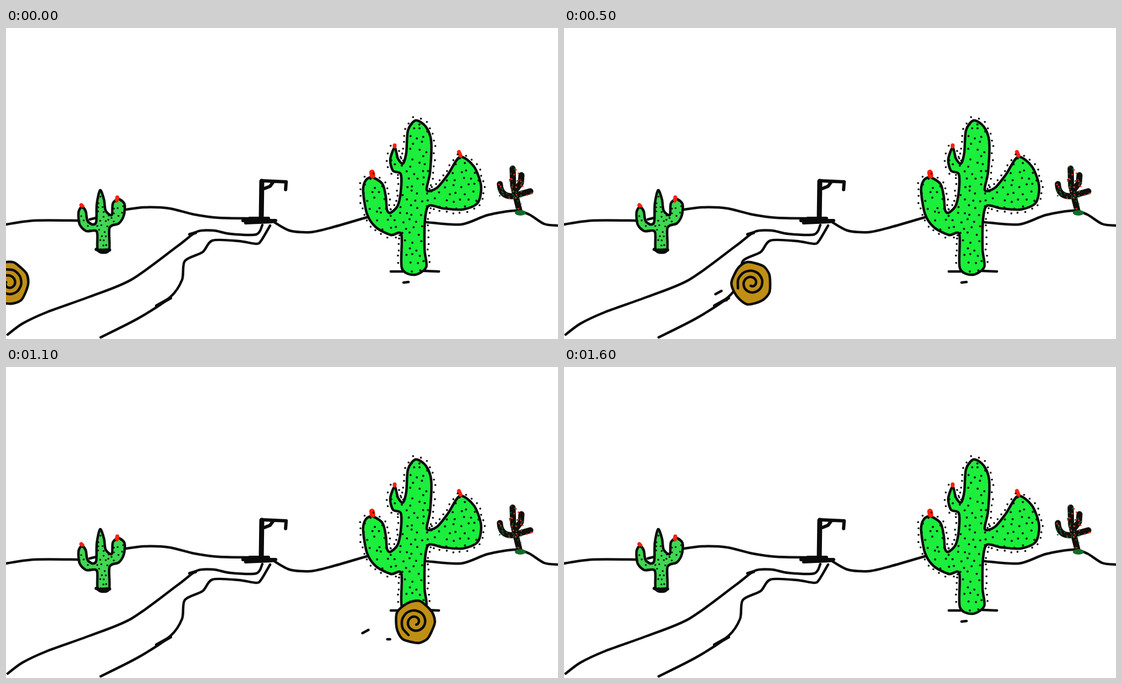
Recreate the animation shown at these times as an HTML page. Size 997 by 562 pixels, loop 2100 ms.

```html
<!DOCTYPE html>
<html lang="en">
<head>
<meta charset="utf-8">
<title>Tumbleweed</title>
<style>
  html, body { margin: 0; width: 100%; height: 100%; overflow: hidden; background: #fff; }
  svg { display: block; width: 100vw; height: 100vh; }
  path { fill: none; stroke: #0b0b0b; stroke-width: 4.5; stroke-linecap: round; stroke-linejoin: round; }
  .thick path { stroke-width: 6; }
  .red path { stroke: #fd1f10; stroke-width: 7; }
  #far path { stroke: #130f0d; stroke-width: 11; }
  #small { fill: #3fd751; }
  #large { fill: #1cee3c; }
  #rim { fill: #bf8f15; }
</style>
</head>
<body>
<svg viewBox="0 0 997 562">
  <!-- hills -->
  <path data-at="0 355, 50 348, 131 348; 151 346, 163 343; 217 328, 250 324, 295 326, 340 337, 385 343, 460 344"/>
  <path data-at="483 350, 512 366, 550 369, 590 360, 652 342; 760 351, 822 355, 870 338, 920 330, 945 337, 972 354, 997 357"/>

  <!-- road -->
  <path data-at="3 554, 30 534, 75 513, 150 486, 226 455, 310 394, 345 368, 375 366, 405 372, 452 373, 463 356"/>
  <path data-at="171 559, 240 524, 297 486, 318 455, 323 421, 355 405, 373 384, 420 385, 452 390, 461 384, 477 357"/>
  <g class="thick"><path d="M332 373L342 370M272 502L297 488"/></g>

  <!-- water pump -->
  <path d="M462 277L461 346" style="stroke-width:9"/>
  <g class="thick"><path d="M462 276L506 278L505 292M467 290L477 286L482 279M428 348H487M440 344H474M433 352L480 350"/></g>

  <!-- small cactus -->
  <path id="small" data-at="166 402, 164 368, 145 367, 133 355, 131 333, 137 323, 144 331, 147 348, 156 355, 163 350, 164 318, 170 293, 177 310, 180 330, 191 338, 193 317, 203 309, 214 318, 213 338, 204 353, 187 361, 186 402"/>
  <g class="thick"><path d="M163 400L168 402L187 401"/></g>

  <!-- large cactus -->
  <path d="M695 440H716M756 439L782 440M718 460L727 459"/>
  <path id="large" data-at="715 434, 714 373, 695 374, 668 360, 652 336, 645 294, 650 275, 662 270, 680 282, 686 305, 688 328, 694 334, 707 322, 713 296, 713 264, 699 258, 694 238, 702 216, 708 236, 717 245, 723 225, 726 185, 740 167, 758 178, 768 205, 766 260, 760 293, 778 289, 798 265, 820 233, 845 250, 858 285, 852 316, 825 328, 790 326, 764 321, 757 345, 756 400, 759 432, 738 446"/>

  <!-- flowers -->
  <g class="red">
    <path d="M136 320L138 322M200 312L201 306M702 212V214M818 224L821 231"/>
    <path d="M661 261L662 267" style="stroke-width:10"/>
  </g>

  <!-- distant cactus -->
  <g id="far">
    <path d="M915 254L916 285L927 329"/>
    <path d="M892 282Q893 304 914 304"/>
    <path d="M931 266L930 280L921 292"/>
    <path d="M922 302L947 295"/>
  </g>
  <ellipse cx="929" cy="334" rx="10" ry="5" fill="#126b28"/>

  <g id="dots"></g>

  <!-- tumbleweed -->
  <path id="dust"/>
  <g id="ball">
    <path id="rim"/>
    <path id="coil"/>
  </g>
</svg>

<script>
const $ = id => document.getElementById(id);
const svg = document.querySelector('svg');

let seed = 11;
const rand = () => (seed = seed * 16807 % 2147483647) / 2147483647;
const jitter = n => (rand() - .5) * n;

// Smooth curve through a list of [x, y]
function curve(p, closed) {
  const n = p.length;
  const at = i => closed ? p[(i + n) % n] : p[Math.max(0, Math.min(n - 1, i))];
  let d = 'M' + p[0];
  for (let i = 0; i < (closed ? n : n - 1); i++) {
    const [a, b, c, e] = [at(i - 1), at(i), at(i + 1), at(i + 2)];
    const h1 = b.map((v, j) => v + (c[j] - a[j]) / 7);
    const h2 = c.map((v, j) => v - (e[j] - b[j]) / 7);
    d += 'C' + [...h1, ...h2, ...c].map(v => v.toFixed(1)).join(' ');
  }
  return d + (closed ? 'Z' : '');
}

const parse = text => text.split(',').map(s => s.trim().split(' ').map(Number));
document.querySelectorAll('[data-at]').forEach(path =>
  path.setAttribute('d', path.dataset.at.split(';').map(s => curve(parse(s), !!path.id)).join('')));

function dot(x, y, r, fill) {
  const c = document.createElementNS(svg.namespaceURI, 'circle');
  const attrs = { cx: x.toFixed(1), cy: y.toFixed(1), r, fill };
  for (const name in attrs) c.setAttribute(name, attrs[name]);
  $('dots').appendChild(c);
}

function inside(shape, x, y) {
  const p = svg.createSVGPoint();
  p.x = x;
  p.y = y;
  return shape.isPointInFill(p);
}

function speckle(shape, gap, r) {
  const b = shape.getBBox();
  for (let y = b.y + 5, row = 0; y < b.y + b.height; y += gap * .9, row++)
    for (let x = b.x + row % 2 * gap / 2; x < b.x + b.width; x += gap) {
      const px = x + jitter(gap * .6), py = y + jitter(gap * .6);
      if (inside(shape, px, py)) dot(px, py, r, '#0c1a0c');
    }
}

// Spines standing just off the outline
function fringe(shape, gap, out, r) {
  for (let s = 0, len = shape.getTotalLength(); s < len; s += gap + jitter(4)) {
    const p = shape.getPointAtLength(s), q = shape.getPointAtLength(s + 1);
    const a = Math.atan2(q.y - p.y, q.x - p.x) - Math.PI / 2, d = out + jitter(3);
    const x = p.x + Math.cos(a) * d, y = p.y + Math.sin(a) * d;
    if (y < 430 && !inside(shape, x, y)) dot(x, y, r, '#0b0b0b');
  }
}

speckle($('small'), 9.5, 1.7);
speckle($('large'), 14, 2);
fringe($('large'), 11, 6, 1.8);

for (const arm of $('far').children)
  for (let s = 0, len = arm.getTotalLength(); s < len; s += 3) {
    const p = arm.getPointAtLength(s);
    dot(p.x + jitter(13), p.y + jitter(11), 1.4, rand() < .35 ? '#e83a22' : '#14602a');
  }

const LOOP = 2100, STEP = 100, LAST = 15;
const START = 5, STRIDE = 66.7, GROUND = 461;
const RAD = Math.PI / 180, TURN = 53 * RAD, PHASE = -106 * RAD;
const range = n => Array.from({ length: n }, (_, i) => i);

// Upright oval whose dents roll with the ball
const rim = turn => curve(range(14).map(i => {
  const a = i / 14 * 2 * Math.PI, k = 1 + .035 * Math.sin(5 * (a - turn));
  return [35 * k * Math.cos(a), 38 * k * Math.sin(a)];
}), true);

// Spiral winding inward from its outer end
const coil = turn => curve(range(19).map(i => {
  const u = i / 18, a = turn + u * 3.7 * Math.PI, r = 26 - 21 * u;
  return [r * Math.cos(a), r * Math.sin(a)];
}));

function show(k) {
  const visible = k <= LAST, x = START + STRIDE * k, turn = PHASE + TURN * k;
  $('ball').style.display = visible ? '' : 'none';
  $('ball').setAttribute('transform', `translate(${x} ${GROUND})`);
  $('rim').setAttribute('d', rim(turn));
  $('coil').setAttribute('d', coil(turn));
  $('dust').setAttribute('d', visible && k ? `M${x - 50} 492h5M${x - 40 - 5 * k} 481l11-6` : '');
}

let shown = -1;
function tick() {
  const k = Math.floor(performance.now() % LOOP / STEP);
  if (k !== shown) show(shown = k);
  requestAnimationFrame(tick);
}
tick();
</script>
</body>
</html>
```
